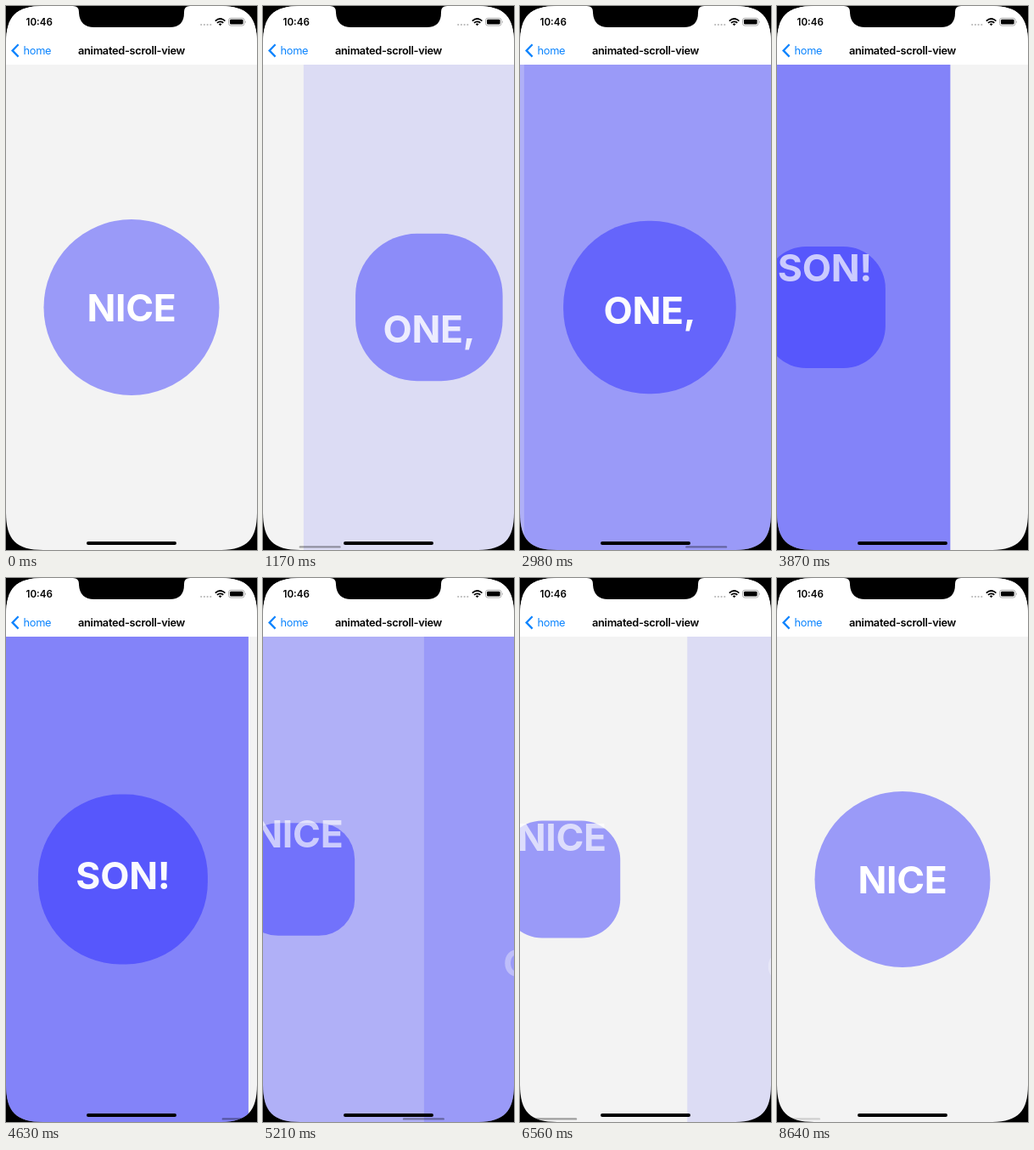
An HTML page for the animation above (8730 ms loop, 296x640 px).

```html
<!DOCTYPE html>
<html lang="en">
<head>
<meta charset="utf-8">
<title>animated-scroll-view</title>
<style>
  html, body { margin: 0; width: 296px; height: 640px; overflow: hidden; background: #000; }
  svg { display: block; }
  text { font-family: Inter, Roboto, sans-serif; }
  .word { font-size: 44.5px; font-weight: 700; letter-spacing: -.3px; text-anchor: middle; fill: #fff; }
  .nav { font-size: 12.8px; letter-spacing: -.3px; }
</style>
</head>
<body>
<svg width="296" height="640" viewBox="0 0 296 640">
  <defs>
    <clipPath id="screen">
      <path d="M0 44C0 12 12 0 44 0H252C284 0 296 12 296 44V596C296 628 284 640 252 640H44C12 640 0 628 0 596Z"/>
    </clipPath>
  </defs>
  <rect width="296" height="640"/>
  <g clip-path="url(#screen)">
    <rect width="296" height="640" fill="#f3f3f3"/>
    <g id="pages"></g>
    <rect id="bar" y="635.2" height="2.4" rx="1.2"/>
    <rect width="296" height="69" fill="#fff"/>
    <rect x="95" y="630" width="106" height="4" rx="2"/>

    <text x="23.5" y="23" font-size="11.6" font-weight="600">10:46</text>
    <g fill="#b8b8b8">
      <circle cx="230.2" cy="22" r="1.1"/><circle cx="233.9" cy="22" r="1.1"/>
      <circle cx="237.6" cy="22" r="1.1"/><circle cx="241.3" cy="22" r="1.1"/>
    </g>
    <g fill="none" stroke="#000" stroke-width="1.7">
      <path d="M246.8 17.6Q252.6 12.4 258.4 17.6M248.9 19.9Q252.6 16.7 256.3 19.9"/>
      <path d="M250.7 21.2Q252.6 19.6 254.5 21.2L252.6 23.2Z" fill="#000" stroke="none"/>
    </g>
    <rect x="262.5" y="14.3" width="18.6" height="8.8" rx="2.6" fill="none" stroke="#a6a6a6" stroke-width=".9"/>
    <rect x="264" y="15.8" width="15.6" height="5.8" rx="1.4"/>
    <path d="M282.2 17.2Q284 18.7 282.2 20.2Z" fill="#a6a6a6"/>

    <path d="M14.6 45.2L7.6 52.4L14.6 59.6" fill="none" stroke="#0b84fe" stroke-width="2.3"/>
    <text class="nav" x="20.5" y="57" fill="#0b84fe">home</text>
    <text class="nav" x="148" y="57" font-weight="600" text-anchor="middle">animated-scroll-view</text>
  </g>
  <path d="M79 0Q86 0 86 7V8Q87 25 104 25H193Q210 25 210 8V7Q210 0 217 0Z"/>
</svg>
<script>
const W = 296, MID = 354.5, SIZE = 207, LOOP = 8730;
const words = ['NICE', 'ONE,', 'SONNY!', 'NICE', 'ONE,', 'SON!'];
const last = words.length - 1;

const swipe = (from, to, lead = 1) => (k, n) =>
  from + (to - from) * (1 - Math.exp(-4.1 * ((k + lead) / n) ** 2));
const bounce = (page, size, rate) => k => {
  const x = (k + 1) * rate;
  return page + size * x * Math.exp(1 - x);
};

// start, last change, number of steps, scroll offset in pages
const moves = [
  [0, 0, 1, swipe(0, 0)],
  [1060, 1290, 3, swipe(0, 1)],
  [1640, 1980, 4, swipe(1, 2)],
  [2140, 2490, 4, swipe(2, 3)],
  [2670, 2980, 4, swipe(3, 4)],
  [3220, 3540, 4, swipe(4, 5)],
  [3750, 4630, 9, bounce(5, .31, .53)],
  [4740, 4950, 3, swipe(5, 4)],
  [5100, 5440, 4, swipe(4, 3)],
  [5560, 5780, 3, swipe(3, 2)],
  [5910, 6250, 4, swipe(2, 1, .7)],
  [6440, 6780, 4, swipe(1, 0, 1.07)],
  [7050, 7350, 4, bounce(0, -.24, .9)],
  [7460, 7460, 1, swipe(0, 0)]
];

function offsetAt(t) {
  const [start, end, n, pos] = moves.filter(m => m[0] <= t).pop();
  const gap = (end - start) / (n - 1) || 1;
  return pos(Math.min(n - 1, Math.floor((t - start + 10) / gap)), n);
}

function add(parent, tag, attrs) {
  const el = document.createElementNS('http://www.w3.org/2000/svg', tag);
  set(el, attrs);
  return parent.appendChild(el);
}

function set(el, attrs) {
  for (const key in attrs) el.setAttribute(key, attrs[key]);
}

const root = document.getElementById('pages');
const bar = document.getElementById('bar');
const blue = alpha => `rgba(20,20,255,${alpha})`;
const pages = words.map((word, i) => {
  const g = add(root, 'g', {});
  add(g, 'rect', { y: 69, width: W, height: 571, fill: blue(i / 10) });
  const disc = add(g, 'rect', { fill: blue(.4) });
  const label = add(g, 'text', { class: 'word', x: W / 2 });
  label.textContent = word;
  return { g, disc, label };
});

function draw(t) {
  const offset = offsetAt(t);
  pages.forEach(({ g, disc, label }, i) => {
    const d = i - offset;
    const scale = Math.max(0, 1 - Math.abs(d));
    const size = SIZE * scale;
    set(g, { transform: `translate(${d * W} 0)` });
    set(disc, { x: (W - size) / 2, y: MID - size / 2, width: size, height: size, rx: size * scale / 2 });
    set(label, { y: 371.3 + d * 152, opacity: scale });
  });

  const inside = Math.min(last, Math.max(0, offset));
  const over = Math.abs(offset - inside) * W;
  const width = Math.max(7, 49 - over);
  const left = 2 + inside * 48.5 + (offset > last ? 49 - width : 0);
  const fade = t < 1060 ? 0 : t < 8490 ? .35 : t < 8640 ? .25 : .15;
  set(bar, { x: left, width, opacity: fade });
}

const begin = performance.now();
function tick() {
  draw((performance.now() - begin) % LOOP);
  requestAnimationFrame(tick);
}
tick();
</script>
</body>
</html>
```
